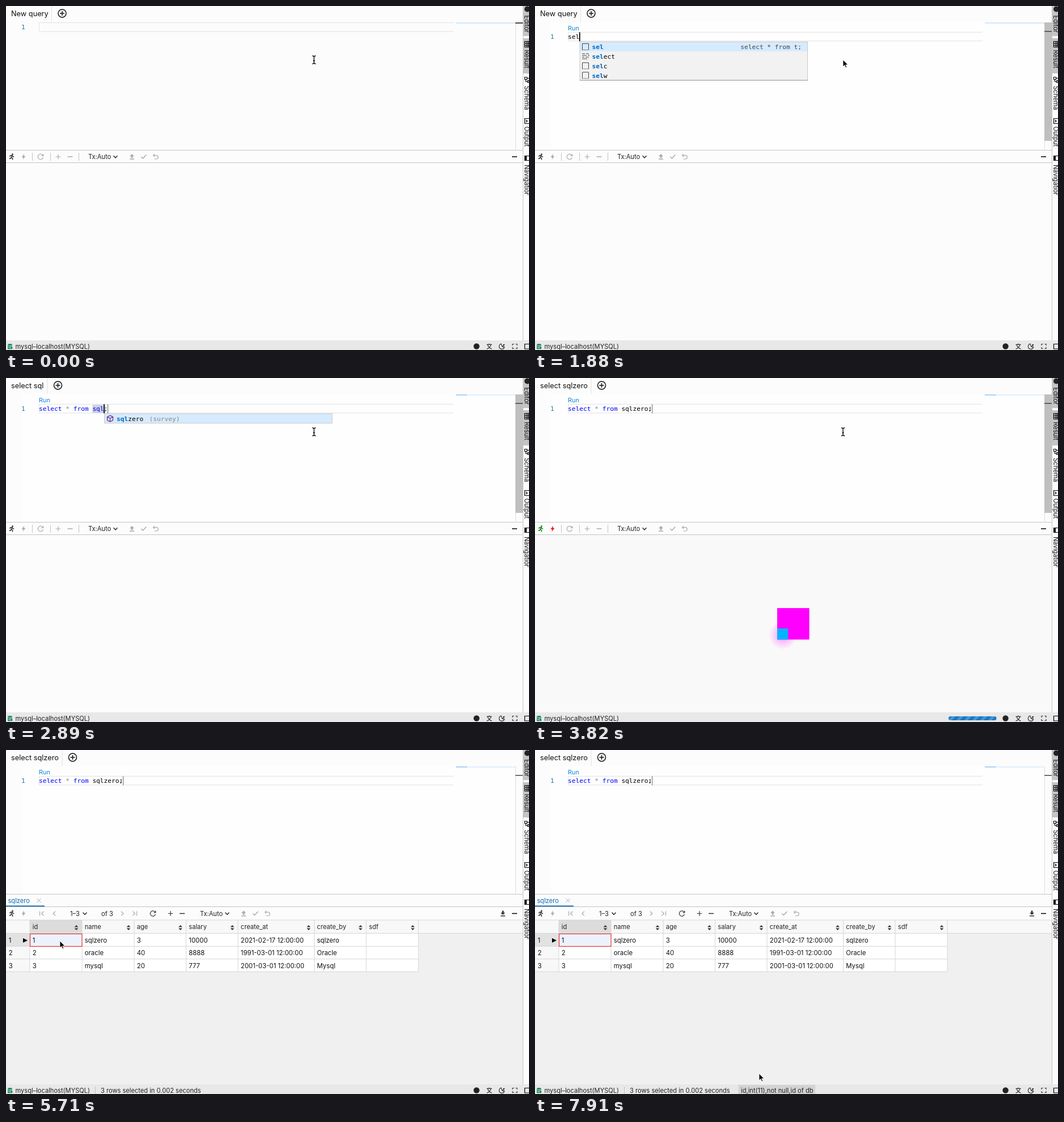
Recreate the animation shown at these times as an HTML page. Size 922x607 px, loop 8 s.

```html
<!DOCTYPE html>
<html lang="en">
<head>
<meta charset="utf-8">
<title>SQL editor</title>
<style>
html, body { margin: 0; width: 100%; height: 100%; overflow: hidden; background: #fcfcfc; }
svg { display: block; width: 100%; height: 100%; }
text { font: 11.1px Inter, "Open Sans", sans-serif; fill: #222; white-space: pre; }
.tab { font-size: 12.75px; fill: #111; }
.cell { font-size: 11.35px; fill: #111; }
.mono { font: 11.2px "DejaVu Sans Mono", monospace; fill: #000; }
.kw { fill: #00f; }
.op { fill: #789; }
.hit { fill: #0066bf; font-weight: bold; }
.strong { font-weight: bold; }
.dim { fill: #888; }
.side { font-size: 11.1px; fill: #111; }
.line { stroke: #c4c4c4; fill: none; }
.grid { stroke: #d6d6d6; fill: none; }
.icon { fill: none; stroke: currentColor; stroke-width: 1.2; }
.thin { stroke-width: 1; }
.bold { stroke-width: 1.5; }
.solid { fill: currentColor; stroke: none; }
</style>
</head>
<body>
<svg id="stage" viewBox="0 0 922 607" preserveAspectRatio="none">
  <defs>
    <radialGradient id="glow"><stop offset=".3" stop-color="#f4f" stop-opacity=".4"/><stop offset="1" stop-color="#f4f" stop-opacity="0"/></radialGradient>
    <pattern id="stripes" width="14" height="7" patternUnits="userSpaceOnUse" patternTransform="translate(729 597)">
      <path d="M0 0H14V7H0z" fill="#1d78c1"/><path d="M0 7L6 0H12L6 7z" fill="#4698d6"/>
    </pattern>
    <g id="run" class="icon bold"><circle class="solid" cx="1.5" cy="-4.3" r="1.4"/><path d="M-3.5 -.6L-2 -2.3H1L2.2 -.3 4.2 0M.5 -2L-.8 1 1.5 2.6V5.4M-.8 1.2L-2 3.3H-4.3"/></g>
    <path id="bolt" class="solid" d="M1 -5.2L-3.4 1H-.5L-1.4 5.2 3.4 -1.3H.5z"/>
    <g id="refresh" class="icon"><path d="M3.9 -2.6A4.7 4.7 0 1 0 4.5 1.4M4.8 -4.8V-1.6H1.6"/></g>
    <path id="plus" class="icon" d="M-4.3 0H4.3M0 -4.3V4.3"/>
    <path id="minus" class="icon bold" d="M-4.5 0H4.5"/>
    <path id="chev" class="icon bold" d="M-3.5 -1.8L0 1.8 3.5 -1.8"/>
    <path id="prev" class="icon" d="M2 -3.8L-2 0 2 3.8"/>
    <path id="next" class="icon" d="M-2 -3.8L2 0 -2 3.8"/>
    <path id="first" class="icon" d="M3.5 -3.8L-.5 0 3.5 3.8M-3.5 -4V4"/>
    <path id="last" class="icon" d="M-3.5 -3.8L.5 0 -3.5 3.8M3.5 -4V4"/>
    <path id="up" class="solid" d="M0 -5L4 -.8H1.4V2.4H-1.4V-.8H-4zM-4 3.6H4V5H-4z"/>
    <path id="down" class="solid" d="M0 2.4L-4 -1.6H-1.4V-5H1.4V-1.6H4zM-4 3.6H4V5H-4z"/>
    <path id="check" class="icon bold" d="M-4.5 0L-1.5 3 4.5 -3.5"/>
    <path id="undo" class="icon" d="M-1.5 -4.8L-4 -2.3 -1.5 .2M-4 -2.3H1.4A3 3 0 0 1 1.4 4H-2"/>
    <path id="sort" class="solid" d="M0 -4.6L3.4 -1H-3.4zM0 4.6L3.4 1H-3.4z"/>
    <path id="close" class="icon thin" d="M-3.5 -3.5L3.5 3.5M3.5 -3.5L-3.5 3.5"/>
    <g id="add" class="icon bold"><circle r="7"/><path d="M-4 0H4M0 -4V4"/></g>
    <path id="keyword" class="icon thin" d="M-6 -4.5H-1M1 -4.5H6M-6 -1.5H2M4 -1.5H7M-6 1.5H-2M0 1.5H6M-6 4.5H3"/>
    <g id="snippet" class="icon thin"><path d="M-5.5 5.5V-5.5H5.5V5.5"/><path stroke-dasharray="1.5 1" d="M-5.5 5.5H5.5"/></g>
    <path id="cube" class="icon" d="M0 -5.5L5 -3V3L0 5.5 -5 3V-3zM-5 -3L0 -.3 5 -3M0 -.3V5.5"/>
    <path id="moon" class="icon" d="M-.5 -4.5A4.7 4.7 0 1 0 4.6 1.5 4.6 4.6 0 0 1 -.5 -4.5M2 -3H4.5L2 -.5H4.5"/>
    <path id="expand" class="icon" d="M-4 -1.5V-4H-1.5M1.5 -4H4V-1.5M4 1.5V4H1.5M-1.5 4H-4V1.5"/>
    <g id="lang" class="icon"><path d="M-4.5 -3.2H4.5M0 -5V-3.2M-3 -3Q-1.5 2.5 4.5 4.7M3 -3Q1.5 2.5 -4.5 4.7"/></g>
  </defs>
</svg>
<script>
const LOOP = 8000, CHAR = 6.74, CODE_X = 58;
const stage = document.getElementById('stage');
const put = html => stage.insertAdjacentHTML('beforeend', html);
const rect = (x, y, w, h, fill, extra = '') => `<rect x="${x}" y="${y}" width="${w}" height="${h}" fill="${fill}" ${extra}/>`;
const path = (d, cls = 'line', extra = '') => `<path d="${d}" class="${cls}" ${extra}/>`;
const text = (x, y, s, cls = '', extra = '') => `<text x="${x}" y="${y}" class="${cls}" ${extra}>${s}</text>`;
const icon = (id, x, y, color = '#333') => `<use href="#${id}" x="${x}" y="${y}" color="${color}"/>`;
const during = (spans, html) => `<g data-on="${spans}">${html}</g>`;
const span = (s, cls) => `<tspan class="${cls}">${s}</tspan>`;
const GREY = '#aaa';

// [start, statement, word being completed, tab title]
const edits = [
  [0, '', '', 'New query'], [960, 's', '', 'New query'], [1190, 'se', '', 'New query'],
  [1370, 'sel', '', 'New query'], [1970, 'snippet', 't', 'New query'], [2320, 'snippet', 's', 'select s'],
  [2620, 'snippet', 'sq', 'select sq'], [2890, 'snippet', 'sql', 'select sql'], [3250, 'snippet', 'sqlzero', 'select sqlzero']
];
const tabEdge = { 'New query': 80, 'select s': 56, 'select sq': 65, 'select sql': 72.5, 'select sqlzero': 98.5 };
const caretSpans = [[480, 3730], [4240, 4750], [5250, 5650]];

// Pointer path: [time, x, y]
const trail = [[0, 543, 95], [4510, 543, 95], [4900, 330, 225], [5300, 50, 352], [5420, 52, 350], [5710, 95, 337],
  [5850, 95, 337], [6150, 140, 332], [6530, 142, 334], [7250, 422, 591], [7909, 422, 591], [7910, 395, 571]];

function drawTabs() {
  const titles = [...new Set(edits.map(e => e[3]))];
  const startOf = title => edits.find(e => e[3] === title)?.[0] ?? LOOP;
  put(titles.map((title, i) => {
    const edge = tabEdge[title];
    return during(`${startOf(title)}-${startOf(titles[i + 1])}`, text(9, 18, title, 'tab') +
      path(`M${edge + .5} 0V28`, 'line', 'style="stroke:#e2e2e2"') + icon('add', edge + 19, 13, '#111'));
  }).join(''));
}

function codeLine(kind, word) {
  if (kind !== 'snippet') return text(CODE_X, 41.3, kind, 'mono');
  const x = CODE_X + 14 * CHAR, end = x + (word.length + 1) * CHAR;
  const done = word === 'sqlzero';
  return (done ? '' : rect(x, 30.5, word.length * CHAR, 14.5, '#cbd2e4')) +
    text(CODE_X, 41.3, span('select', 'kw') + ' ' + span('*', 'op') + ' ' + span('from', 'kw') + ' ' +
      span(word, word === 'sql' ? 'kw' : '') + span(';', done ? 'strong' : ''), 'mono') +
    rect(end - .2, 29.5, 1, 16, '#566a88');
}

function drawEditor() {
  put(during(`1280-${LOOP}`, rect(28, 29, 870, 225, '#fefefe') + text(58, 43, 'Run', '', 'style="fill:#0a84d8;font-size:10.9px"')));
  put(path('M898.5 29V253', 'line', 'style="stroke:#ddd"'));
  put(`<g id="line">${path('M789 29.5H58.5V45H789', 'line', 'style="stroke:#e2e2e2"')}
    ${text(27, 41.3, '1', 'mono', 'style="fill:#237893"')}
    ${edits.map(([from, kind, word], i) => during(`${from}-${edits[i + 1]?.[0] ?? LOOP}`, codeLine(kind, word))).join('')}
    <rect id="caret" y="29.5" width="1.8" height="16" fill="#000"/></g>`);
  put(rect(793, 29, 105, 2, '#d3e8fd'));
  put(during('1970-8000', rect(793, 29, 20, 1.6, '#9fcdf5') + rect(813, 29, 85, 2, '#e2f0fd')));
  put('<rect id="scrollbar" x="898" y="29" width="13" height="209" fill="#bfbfbf"/>');
  put(rect(898, 29, 13, 2, '#444', 'data-on="0-1280"'));
  put(rect(898, 44, 13, 1.5, '#444', 'data-on="1280-8000"'));
}

// Each row: [icon, matched part, rest, detail, detail x offset]
function popup(spans, x, y, rows) {
  const w = 401.5, rowH = 16.8, h = rows.length * rowH;
  put(during(spans, rect(x, y, w, h, '#f2f2f2') + rect(x, y, w, rowH, '#d6ebff') +
    rows.map(([kind, hit, rest, detail = '', dx = 0], i) => {
      const top = y + i * rowH;
      return icon(kind, x + 10, top + 8.6, kind === 'cube' ? '#652d90' : '#444') +
        text(x + 21.5, top + 12.8, span(hit, 'hit') + rest, 'mono') +
        (dx < 0 ? text(x + w + dx, top + 12.8, detail, 'mono', 'text-anchor="end" style="fill:#444"')
                : text(x + dx, top + 12.8, detail, 'mono dim'));
    }).join('') +
    rect(x, y, w, h, 'none', 'stroke="#c8c8c8"') + (rows.length > 1 ? rect(x - .5, y + h - .5, w + 1, 2, '#c0c0c0') : '')));
}

function drawPopups() {
  const others = hit => ['c', 'w'].map(c => ['snippet', hit, 'sel'.slice(hit.length) + c]);
  const keyword = (hit, ...detail) => ['keyword', hit, 'select'.slice(hit.length), ...detail];
  popup('960-1190', 64.8, 46.5, [keyword('s', 'keyword', -10), ['snippet', 's', 'el'], ...others('s')]);
  popup('1190-1280', 71.6, 46.5, [keyword('se', 'keyword', -10), ['snippet', 'se', 'l'], ...others('se')]);
  popup('1280-1370', 71.6, 63.3, [keyword('se', 'keyword', -10), ['snippet', 'se', 'l'], ...others('se')]);
  popup('1370-1970', 79, 63.3, [['snippet', 'sel', '', 'select * from t;', -10.5], keyword('sel'), ...others('sel')]);
  [['2380-2620', 's'], ['2710-2890', 'sq'], ['2890-3250', 'sql']].forEach(([when, hit]) =>
    popup(when, 153.3 + hit.length * CHAR, 63, [['cube', hit, 'sqlzero'.slice(hit.length), '(survey)', 79]]));
}

const txTools = (x, y) => text(x, y + 4, 'Tx:Auto') + icon('chev', x + 48, y) +
  ['up', 'check', 'undo'].map((id, i) => icon(id, x + 77 + i * 20.8, y, GREY)).join('');

function drawEmptyResult() {
  const y = 266;
  put(path('M0 254.5H911'));
  put(during('0-4000', path('M0 276.5H911') + [46.5, 78.5, 128.5].map(x => path(`M${x} 259V273`)).join('') +
    icon('refresh', 61, y, GREY) + icon('plus', 92, y, GREY) + icon('minus', 113, y, GREY) +
    txTools(145, y) + icon('minus', 896.5, y, '#000')));
  put(during('0-3730', icon('run', 10, y) + icon('bolt', 31, y, GREY)));
  put(during('3730-4000', rect(0, 277, 911, 313, '#f9f9f9') + icon('run', 10, y, '#088a12') + icon('bolt', 31, y, '#f00')));
  put(during('3820-4000', '<circle cx="437" cy="454" r="25" fill="url(#glow)"/>' +
    rect(427, 406, 56.5, 55.5, '#f0f') + rect(427, 442, 19, 19.5, '#00b4ff')));
}

function drawTable() {
  const edges = [0, 42, 134, 226, 317.5, 409, 543.5, 635, 727];
  const heads = ['', 'id', 'name', 'age', 'salary', 'create_at', 'create_by', 'sdf'];
  const rows = [
    ['1', '1', 'sqlzero', '3', '10000', '2021-02-17 12:00:00', 'sqlzero'],
    ['2', '2', 'oracle', '40', '8888', '1991-03-01 12:00:00', 'Oracle'],
    ['3', '3', 'mysql', '20', '777', '2001-03-01 12:00:00', 'Mysql']
  ];
  const rowY = i => 324 + i * 22.4;
  const cells = rows.map((row, i) => row.map((s, c) => text(edges[c] + 4.8, rowY(i) + 15.8, s, 'cell')).join('')).join('');
  return rect(0, 300, 911, 290, '#f0f0f0') + rect(0, 300, 911, 23.5, '#f8f8f8') + rect(42, 300, 92, 23.5, '#dcdcdc') +
    rect(42, 324, 685, 67.2, '#fff') + rect(0, 324, 42, 67.2, '#f8f8f8') + rect(0, 324, 42, 22.4, '#e2e2e2') +
    rect(42, 324, 92, 22.4, '#edf1fc') +
    path('M0 300H911M0 323.5H911' + [1, 2, 3].map(i => `M0 ${rowY(i)}H727`).join(''), 'grid') +
    path(edges.slice(1).map(x => `M${x} 300V391`).join(''), 'grid') +
    heads.map((s, c) => c ? text(edges[c] + 4.8, 316, s) + icon('sort', edges[c + 1] - 10, 313.5) : '').join('') +
    cells + path('M30 332L38 336 30 340z', 'solid') +
    during('5560-8000', rect(42.5, 324.5, 91.5, 22, 'none', 'stroke="#f01818"'));
}

function drawResult() {
  const y = 288.5;
  put(during('4000-8000', rect(0, 255, 911, 335, '#fcfcfc') + text(3.5, 269.5, 'sqlzero', '', 'style="fill:#1068b0"') +
    icon('close', 58, 265.5, GREY) + path('M0 276.5H911') + rect(0, 274.5, 68, 1.8, '#1068b0') +
    icon('run', 10, y) + icon('bolt', 31, y, GREY) + icon('first', 63, y, GREY) + icon('prev', 85, y, GREY) +
    text(113, 292.5, '1–3') + icon('chev', 139, y) + text(168, 292.5, 'of 3') +
    icon('next', 205, y, GREY) + icon('last', 227, y, GREY) + icon('refresh', 259, y) +
    icon('plus', 290, y) + icon('minus', 310.5, y) + txTools(342, y) +
    icon('down', 876, y) + icon('minus', 896.5, y, '#000') + drawTable()));
}

function drawStatus() {
  const y = 600.5;
  put(rect(0, 590, 922, 17, '#e8e8e8'));
  put(`<g fill="#168a58">${path('M3 597.5a4 1.6 0 0 1 8 0V604a4 1.6 0 0 1 -8 0z', '')}
    ${path('M3 598a4 1.6 0 0 0 8 0M3 601a4 1.6 0 0 0 8 0', 'icon', 'color="#e8e8e8" style="stroke-width:.8"')}
    ${rect(7.2, 601, 4.5, 4.5, '#168a58', 'stroke="#e8e8e8" stroke-width=".7"')}</g>`);
  put(text(16.5, 604.5, 'mysql–localhost(MYSQL)'));
  put(during('4000-8000', path('M157.5 594V607') + text(167, 604.5, '3 rows selected in 0.002 seconds')));
  put(during('5990-8000', rect(358.5, 591, 135.5, 16, '#d3d3d3') + text(363, 604.5, 'id,int(11),not null,id of db')));
  put(during('3730-4000', rect(729, 597, 84.5, 7, 'url(#stripes)', 'rx="3.5"')));
  put(`<circle cx="829.5" cy="${y}" r="5.2" fill="#222"/>`);
  put(icon('lang', 852, y));
  put(icon('moon', 874, y));
  put(icon('expand', 897, y));
  put(path('M922 596.5H914.5V605H922', 'icon'));
}

function drawSidebar() {
  put(rect(911, 0, 11, 590, '#fcfcfc'));
  put(rect(912, 0, 10, 53, '#c4c4c4'));
  put(rect(912, 57, 10, 62, '#c4c4c4'));
  put(path('M911.5 0V590'));
  put('<circle cx="919" cy="5.5" r="5" fill="#222"/>');
  put(path('M914.5 62.5H922M914.5 66H922M914.5 69.5H922M914.5 72.5H922M914.5 62V73M918.5 62V73M921.5 62V73', 'icon'));
  put(path('M914.5 125.5H918.5V129.5H914.5zM918.5 127.5H922M916.5 129.5V133.5H919M919.5 131.5H922V135H919.5z', 'icon'));
  put(path('M922 198.5H914.5V207.5H922M916.5 201L919 203 916.5 205', 'icon'));
  put(path('M922 264.5H914.5V272.5H922', 'icon') + rect(914, 264, 4, 9, '#111'));
  [['Editor', 16.5], ['Result', 77.5], ['Schema', 141], ['Output', 212.5]].forEach(([s, y]) =>
    put(text(0, 0, s, 'side', `transform="translate(914 ${y}) rotate(90)"`)));
  put(`<svg width="922" height="333.5" style="width:922px;height:333.5px">${text(0, 0, 'Navigation', 'side', 'transform="translate(914 280) rotate(90)"')}</svg>`);
}

function drawPointer() {
  put(`<g id="pointer">
    <path id="ibeam" d="M-3 -7Q0 -7 0 -5Q0 -7 3 -7M0 -5V5M-3 7Q0 7 0 5Q0 7 3 7M-1.5 1.5H1.5" fill="none" stroke="#000" stroke-width="1.3"/>
    <path id="arrow" d="M0 0V12L2.8 9.4 4.8 13.8 6.7 13 4.8 8.7H8.8z" fill="#000" stroke="#fff" stroke-width=".8"/></g>`);
}

drawTabs(); drawEditor(); drawEmptyResult(); drawResult(); drawStatus(); drawSidebar(); drawPopups(); drawPointer();

const $ = id => document.getElementById(id);
const timed = [...document.querySelectorAll('[data-on]')].map(el => [el, ...el.dataset.on.split('-').map(Number)]);
const show = (el, on) => { el.style.display = on ? '' : 'none'; };

function pointerAt(t) {
  const i = trail.findLastIndex(p => p[0] <= t), [t0, x0, y0] = trail[i], next = trail[i + 1];
  if (!next) return [x0, y0];
  const k = (t - t0) / (next[0] - t0);
  return [x0 + (next[1] - x0) * k, y0 + (next[2] - y0) * k];
}

function render(t) {
  timed.forEach(([el, from, to]) => show(el, t >= from && t < to));
  $('line').setAttribute('transform', `translate(0 ${t < 1280 ? 0 : 16.8})`);

  const [, kind, word] = edits.findLast(e => e[0] <= t);
  const column = kind === 'snippet' ? 14 + word.length : kind.length;
  $('caret').setAttribute('x', CODE_X + column * CHAR - .4);
  show($('caret'), caretSpans.some(([from, to]) => t >= from && t < to));
  $('scrollbar').setAttribute('opacity', t < 1280 ? 0 : Math.min(1, Math.max(0, (5500 - t) / 500)));

  const [x, y] = pointerAt(t), arrow = (t >= 1280 && t < 1970) || y > 254;
  $('pointer').setAttribute('transform', `translate(${x} ${y})`);
  show($('arrow'), arrow);
  show($('ibeam'), !arrow);
}

const begin = performance.now();
(function tick() {
  render((performance.now() - begin) % LOOP);
  requestAnimationFrame(tick);
})();
</script>
</body>
</html>
```
